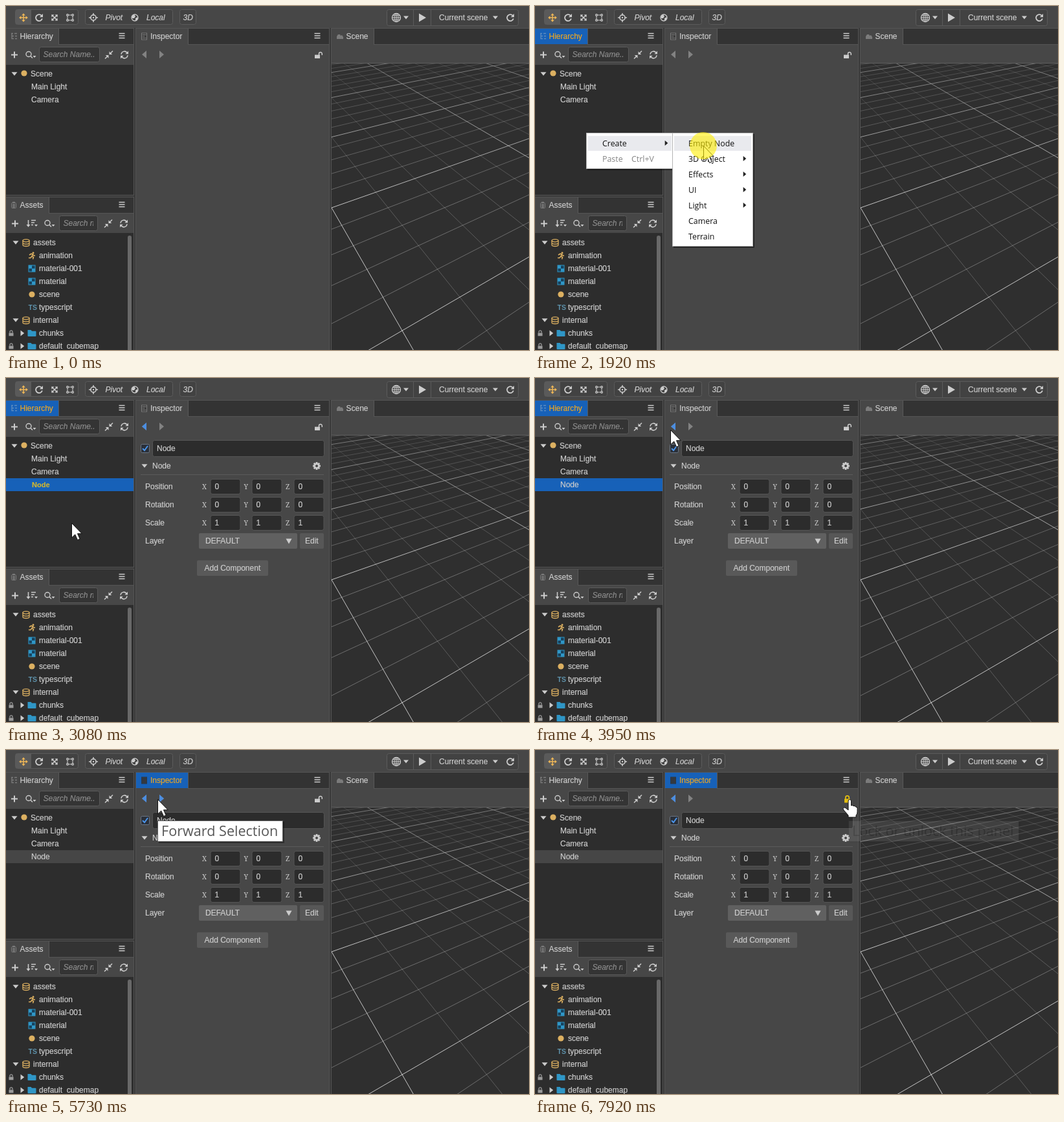
Recreate the animation shown at these times as an HTML page. Size 808x532 px, loop 8000 ms.

```html
<!DOCTYPE html>
<html lang="en">
<head>
<meta charset="utf-8">
<title>Editor walkthrough</title>
<style>
html,body{margin:0;width:100%;height:100%;overflow:hidden;background:#474747}
svg{display:block;width:808px;height:532px}
text{font:12px "Liberation Sans",Arial,sans-serif;fill:currentColor;stroke:currentColor;stroke-width:.2;white-space:pre}
.i{font-style:italic}
.m{font:12.4px "Open Sans","Noto Sans",sans-serif;stroke:none}
.tip{font:21.6px "Open Sans","Noto Sans",sans-serif;stroke:none}
.ax{font:10.5px "Noto Serif","Liberation Serif",serif;stroke:none}
.ts{font-weight:bold;font-size:10.5px;stroke:none}
</style>
</head>
<body>
<svg id="stage" viewBox="0 0 808 532"></svg>
<script>
const FG = '#cccccc', PANEL = '#474747', STRIP = '#333333', DARK = '#2d2d2d', EDGE = '#545454';
const BLUE = '#1761b8', GOLD = '#dcb061', SKY = '#2f96c6', LOOP = 8000;

// --- drawing helpers ---
const rect = (x, y, w, h, fill, extra = '') =>
  `<rect x="${x}" y="${y}" width="${w}" height="${h}" fill="${fill}" ${extra}/>`;
const box = (x, y, w, h, fill, line, r = 3) =>
  rect(x + .5, y + .5, w - 1, h - 1, fill, `rx="${r}" stroke="${line}"`);
const text = (x, y, s, color = FG, cls = '', extra = '') =>
  `<text x="${x}" y="${y}" class="${cls}" color="${color}" ${extra}>${s}</text>`;
const fill = (d, c = FG) => `<path d="${d}" fill="${c}"/>`;
const line = (d, c = FG, w = 1.5) => `<path d="${d}" fill="none" stroke="${c}" stroke-width="${w}"/>`;
const dot = (x, y, r, c) => `<circle cx="${x}" cy="${y}" r="${r}" fill="${c}"/>`;
const ring = (x, y, r, c = FG, w = 1.4) =>
  `<circle cx="${x}" cy="${y}" r="${r}" fill="none" stroke="${c}" stroke-width="${w}"/>`;
const at = (x, y, s) => `<g transform="translate(${x} ${y})">${s}</g>`;
const turn = (a, s) => `<g transform="rotate(${a})">${s}</g>`;
const clip = (x, y, w, h, s) =>
  `<svg x="${x}" y="${y}" width="${w}" height="${h}" viewBox="${x} ${y} ${w} ${h}">${s}</svg>`;
// visible only inside the listed time spans
const during = (spans, s) => `<g data-on="${spans}">${s}</g>`;

// --- icons, centred on 0,0 ---
const down = (c = FG, r = 4.5) => fill(`M${-r}${-r * .6}H${r}L0 ${r * .6}z`, c);
const right = (c = FG) => fill('M-2.5-4.5V4.5L3.2 0z', c);
const plus = line('M-5 0H5M0-5V5', FG, 2);
const burger = line('M-4.5-3.5H4.5M-4.5 0H4.5M-4.5 3.5H4.5', FG, 1.5);
const search = ring(-2, -.5, 4) + line('M1 2.5L4 5.5') + at(7, 3.5, down(FG, 2.5));
const shrink = line('M6-6L2-2M-6 6L-2 2') + fill('M.5-5.2V-.5H5.2zM-.5 5.2V.5H-5.2z');
const sync = line('M-5-.8A5 5 0 0 1 4-3.3M5 .8A5 5 0 0 1-4 3.3') + fill('M6-6V-1.3H1.4zM-6 6V1.3H-1.4z');
const reload = line('M3.8-3.2A5 5 0 1 0 4.9 1.5', FG, 1.8) + fill('M6-6V-.8H.8z');
const tips = (c, a) => [0, 90, 180, 270].map(d =>
  turn(d + a, line('M0 0V-4', c, 1.5) + fill('M0-6.8L2.8-3.6H-2.8z', c))).join('');
const frame = box(-4.5, -4.5, 9, 9, 'none', FG, 0) +
  [[-4, -4], [4, -4], [-4, 4], [4, 4]].map(p => dot(p[0], p[1], 2, FG) + dot(p[0], p[1], .8, PANEL)).join('');
const target = ring(0, 0, 4.2) + dot(0, 0, 1.2, FG) + line('M0-7V-3M0 7V3M-7 0H-3M7 0H3');
const globe = ring(0, 0, 6.5, FG, 1.3) + '<ellipse rx="3" ry="6.5" fill="none" stroke="#ccc"/>' +
  line('M-6.5 0H6.5M0-6.5V6.5M-5.5-3.3H5.5M-5.5 3.3H5.5', FG, 1);
const earth = ring(0, 0, 5, FG, 1.3) + fill('M-4.5-2L-1-5L1-2L-1 1L-4 1zM1 1L4.5-1L4 3L1 5z');
const drum = line('M-5-3.2V3.5A5 2 0 0 0 5 3.5V-3.2M-5 .2A5 2 0 0 0 5 .2', GOLD, 1.3) +
  `<ellipse cy="-3.2" rx="5" ry="2" fill="none" stroke="${GOLD}" stroke-width="1.3"/>`;
const runner = dot(2, -4.3, 1.5, GOLD) + line('M-4-1L-1-2.8L1.5-1.8L0 1L2.5 2.5L1.5 5.5M0 1L-2 3.5H-5M1.5-1.8L3 0H5', GOLD, 1.6);
const checker = box(-5.5, -5.5, 11, 11, '#17435e', SKY, 0) + rect(-5, -5, 5, 5, SKY) + rect(0, 0, 5, 5, SKY);
const folder = fill('M-6.5-5H-1.5L0-3.3H5.5Q6.5-3.3 6.5-2.3V4Q6.5 5 5.5 5H-5.5Q-6.5 5-6.5 4z', SKY);
const padlock = c => rect(-3.5, -.5, 7, 4.8, c) + line('M-2-.5V-2.2A2 2 0 0 1 2-2.2V-.5', c, 1.3);
const gear = [0, 45, 90, 135].map(a => turn(a, rect(-1.4, -6, 2.8, 12, FG))).join('') +
  dot(0, 0, 4.4, FG) + dot(0, 0, 2, PANEL);
const treeIcon = c => line('M-4-4.5H-1M-3 -4V3.5H0M-3-.5H0M1-4.5H5M2-.5H5M2 3.5H5', c, 1.3);
const pageIcon = c => box(-4.5, -5.5, 9, 11, '#3a3a3a', c, 0) + line('M-3-2.5H3M-3 0H1M-3 2.5H3', c, 1);
const clipIcon = c => box(-4, -4, 8, 9, 'none', c, 1) + line('M-2-4.5H2M-2-1H2M-2 1H2M-2 3H2', c, 1.3);
const cloudIcon = c => fill('M-5 4V0L-3-3H0L1-1L3-2L5 1V4z', c);

// --- panels ---
function topBar() {
  const edge = '#5b5b5b', bg = '#424242';
  return rect(0, 0, 808, 34, PANEL) +
    box(14, 5, 98, 24, bg, edge) + rect(15, 6, 24, 22, '#5a5a5a') +
    at(27, 18, tips('#efb757', 0)) + at(51, 18, reload) + at(75, 18, tips(FG, 45)) + at(99, 18, frame) +
    box(122, 5, 136, 24, bg, edge) + at(135, 18, target) + text(153.5, 22, 'Pivot', FG, 'i') +
    at(199, 18, earth) + text(217, 22, 'Local', FG, 'i') +
    box(268, 5, 26, 24, bg, edge) + text(273.5, 22, '3D', FG, 'i') +
    box(588, 5, 204, 26, bg, edge) + rect(629, 6, 1, 24, edge) + rect(656, 6, 1, 24, edge) +
    at(603, 18, globe) + at(618, 18, down(FG, 4)) + at(643, 18, fill('M-5-6.5V6.5L6 0z')) +
    text(669, 22, 'Current scene') + at(756, 18, down(FG, 4)) + at(779, 18, reload);
}

// thin light outline of a dock area
const dock = (x, y, w, h) => box(x - 1, y - 1, w + 2, h + 2, PANEL, EDGE, 0);

function tab(x, y, w, panelW, label, icon, ix, focus) {
  const face = (h, bg, fg, ic) => rect(x, y, w, h, bg) + at(ix, y + 12, icon(ic)) +
    text(ix + 9.5, y + 16, label, fg);
  return rect(x, y, panelW, 25, STRIP) + face(25, PANEL, FG, '#7b7b7b') +
    rect(x + w, y, 1, 25, '#595959') + rect(x + w, y + 24, panelW - w, 1, '#555') +
    (focus ? during(focus, face(24, BLUE, '#eaa526', label === 'Inspector' ? '#26374c' : '#5d8cc0')) : '');
}

const field = (x, y, w, h, s) => box(x, y, w, h, '#343434', '#5a5a5a') +
  clip(x + 6, y, w - 13, h, text(x + 6.5, y + h / 2 + 4, s, '#8b8b8b', 'i'));

function hierarchy() {
  return dock(0, 35, 197, 257) + tab(0, 35, 81, 197, 'Hierarchy', treeIcon, 12, '840-4180') + at(179, 46, burger) +
    rect(0, 60, 197, 31, PANEL) + at(13, 75.5, plus) + at(37, 75, search) +
    field(51, 63, 94, 24, 'Search Name...') + at(159, 75.5, shrink) + at(183, 75.5, sync) +
    rect(0, 91, 197, 201, DARK) +
    at(13, 105, down()) + dot(28, 104, 4.6, GOLD) + text(38, 108.5, 'Scene') +
    text(39, 129, 'Main Light') + text(39, 149, 'Camera') +
    during('2000-2610', box(34, 155, 160, 20, '#232323', '#3a7fd0') + rect(38, 158, 30, 14, BLUE) + text(39, 169, 'Node', '#eee')) +
    during('2610-4180', rect(0, 155, 197, 20, BLUE)) +
    during('4180-4340,5730-8000', rect(0, 155, 197, 20, '#464646')) +
    during('2610-8000', text(39, 169, 'Node', FG, '', 'id="node"'));
}

function assets() {
  const leaf = (y, icon, s) => at(40, y, icon) + text(51, y + 4, s);
  const root = (y, s) => at(15, y, down()) + at(31, y, drum) + text(42, y + 4, s);
  const dir = (y, s) => at(8, y, padlock('#9a9a9a')) + at(25, y, right()) + leaf(y, folder, s);
  const sort = line('M-4.5-5V4M0-4.5H7M0-1H5M0 2.5H3') + fill('M-7.5 2H-1.5L-4.5 6z') + at(7.5, 3.5, down(FG, 2.5));
  return dock(0, 296, 197, 240) + tab(0, 296, 66, 197, 'Assets', clipIcon, 12) + at(179, 307, burger) +
    rect(0, 321, 197, 30, PANEL) + at(14, 336.5, plus) + at(39, 336, sort) + at(66, 336, search) +
    field(82, 324, 60, 24, 'Search name') + at(158, 336.5, shrink) + at(182, 336.5, sync) +
    rect(0, 351, 197, 181, DARK) + rect(188, 355, 6, 190, '#686868', 'rx="3"') +
    root(366, 'assets') + leaf(386, runner, 'animation') + leaf(406, checker, 'material-001') +
    leaf(426, checker, 'material') + leaf(446, dot(0, 0, 4.6, GOLD), 'scene') +
    leaf(466, text(-5.5, 4, 'TS', '#5f93ad', 'ts'), 'typescript') +
    root(486, 'internal') + dir(506, 'chunks') + dir(526, 'default_cubemap');
}

function props() {
  const input = (x, y, w, h, s) => box(x, y, w, h, '#2c2c2c', '#555') + text(x + 7, y + h / 2 + 4, s);
  const vec = (y, label, v) => text(215, y + 4, label) + [[303, 'X', 316], [367.5, 'Y', 380], [432, 'Z', 445]]
    .map(([lx, n, ix]) => text(lx, y + 3.5, n, FG, 'ax') + input(ix - .5, y - 12, 47, 24, v)).join('');
  return box(208, 102, 14, 14, '#2a2f38', '#6a7686', 2) + line('M211 109L214 112L219 105', '#4a96ee', 2) +
    input(226, 96, 266, 26, 'Node') +
    at(214, 136, down()) + text(226, 140, 'Node') + at(480, 136, gear) + rect(208, 149, 283, 1, '#5b5b5b') +
    vec(168, 'Position', 0) + vec(196, 'Rotation', 0) + vec(224, 'Scale', 1) +
    text(215, 256, 'Layer') + rect(298, 240, 152, 24, '#606060', 'rx="2"') + text(308, 256, 'DEFAULT') +
    at(437, 252, fill('M-4.5-3.5H4.5L0 4.5z')) +
    rect(454, 240, 37, 24, '#575757', 'rx="2"') + text(462, 256, 'Edit') +
    rect(295, 282, 110, 24, '#595959', 'rx="2"') + text(306.5, 298, 'Add Component');
}

function inspector() {
  const back = c => fill('M217 69V81L210 75z', c), next = c => fill('M237 69V81L244 75z', c);
  return dock(201, 35, 298, 500) + tab(201, 35, 80, 298, 'Inspector', pageIcon, 213.5, '4180-8000') + at(481, 46, burger) +
    rect(201, 60, 298, 472, PANEL) +
    back('#828282') + next('#828282') +
    during('2610-4640,5730-8000', back('#4b8de0')) + during('4340-5810', next('#4b8de0')) +
    during('0-7540', rect(477, 75.5, 8, 5.5, FG) + line('M483.5 76V74A2.4 2.4 0 0 1 488.3 74V76', FG, 1.5)) +
    during('7540-8000', rect(478, 75.5, 9, 6, '#e3bd10') + line('M479.8 76V73.5A2.7 2.7 0 0 1 485.2 73.5V76', '#e3bd10', 1.7)) +
    during('2610-4490,5730-8000', props());
}

function scene() {
  // two families of lines, each running to its own vanishing point
  const O = [503, 312], A = [1600, -73], B = [282, -73], ka = .0663, kb = -.0661;
  const on = (vp, k, n) => [0, 1].map(i => (O[i] + vp[i] * k * n) / (1 + k * n));
  const ray = (p, vp, n, dim) => {
    const pt = s => (vp[0] + (p[0] - vp[0]) * s).toFixed(1) + ' ' + (vp[1] + (p[1] - vp[1]) * s).toFixed(1);
    const major = n % 5 === 0;
    return `<path d="M${pt(.02)}L${pt(4)}" stroke="#fff" stroke-opacity="${major ? .72 : dim}"/>`;
  };
  let grid = '';
  for (let n = -35; n < 15; n++) grid += ray(on(B, kb, n), A, n, .3);
  for (let n = -1; n < 40; n++) grid += ray(on(A, ka, n), B, n, .22);
  return dock(503, 35, 310, 500) + tab(503, 35, 65, 305, 'Scene', cloudIcon, 516, '') +
    rect(503, 60, 305, 28, PANEL) + rect(503, 88, 305, 1, '#5f5f5f') + rect(503, 89, 305, 443, '#2f2f2f') +
    '<linearGradient id="fade" x2="0" y2="1"><stop stop-color="#777"/><stop offset=".5" stop-color="#fff"/></linearGradient>' +
    `<mask id="far" maskUnits="userSpaceOnUse" x="503" y="89" width="305" height="443">${rect(503, 89, 305, 443, 'url(#fade)')}</mask>` +
    `<g mask="url(#far)">${clip(503, 89, 305, 443, grid)}</g>`;
}

function menus() {
  const sheet = (x, y, w, h) => rect(x + 2, y + 2, w, h, '#000', 'opacity=".45"') + box(x, y, w, h, '#fff', '#b4b4b4', 0);
  const hot = (x, w) => rect(x, 201, w, 23, '#e9eaee');
  const more = (x, y) => at(x, y, fill('M-2.3-4V4L2.3 0z', '#222'));
  const items = ['Empty Node', '3D Object', 'Effects', 'UI', 'Light', 'Camera', 'Terrain'];
  return during('840-2000', sheet(79, 196, 134, 56) + during('990-2000', hot(82, 129)) +
      text(104, 217, 'Create', '#111', 'm') + more(203, 212) +
      text(104, 241, 'Paste', '#858585', 'm') + text(149, 241, 'Ctrl+V', '#858585', 'm')) +
    during('1310-2000', sheet(212, 196, 125, 176) + during('1680-2000', hot(215, 119)) +
      items.map((s, i) => text(237, 217 + 24 * i, s, '#111', 'm') + (i > 0 && i < 5 ? more(324, 212 + 24 * i) : '')).join(''));
}

const tip = (id, x, w, s) => `<g id="${id}">${rect(x + 2, 111, w, 33, '#000', 'opacity=".35"')}` +
  box(x, 109, w, 33, '#fff', '#5e5e5e', 0) + text(x + 6, 133, s, '#575757', 'tip') + '</g>';

const arrow = '<path d="M.5.5V23L5.7 18L9.6 26.5L13.2 25L9.5 16.7H16.2z" fill="#fff" stroke="#111"/>';
const hand = '<path d="M-1 3Q-1 .5 1.2.5Q3.5.5 3.5 3V10Q5.5 9 7 10.5Q9.5 10 10.5 12Q13 12 13 14.5V20Q13 23 11 25V28H-1V25L-8 17Q-10 14.5-8 13Q-6 12.4-4 14.5L-1 17z" fill="#fff" stroke="#111"/>';
const press = (spans, x, y) => during(spans, `<g opacity=".6">${dot(x, y, 21, '#ffee00')}</g>`);

const stage = document.getElementById('stage');
stage.innerHTML = rect(0, 0, 808, 532, '#383838') + topBar() + hierarchy() + assets() + inspector() + scene() + menus() +
  tip('tipNext', 234, 194, 'Forward Selection') + tip('tipLock', 484, 264, 'Lock or unlock this panel') +
  `<g id="cursor">${during('210-7290', arrow)}${during('7290-8000', hand)}</g>` +
  press('1920-2000', 260, 216) + press('4180-4340', 214, 75) +
  press('5420-5730', 234, 76) + press('7370-7540', 484, 75);

// --- motion: start, end, steps, way points ---
const moves = [
  [210, 760, 8, [[487, 475], [420, 400], [250, 270], [120, 208], [79, 196]], true],
  [990, 1140, 3, [[79, 196], [83, 207]]],
  [1310, 1680, 6, [[83, 207], [112, 190], [190, 188], [245, 207], [260, 216]]],
  [2230, 2460, 4, [[260, 216], [180, 222], [112, 225], [101, 224]]],
  [3480, 4030, 8, [[101, 224], [116, 200], [165, 135], [204, 85], [214, 75]]],
  [5190, 5270, 2, [[214, 75], [226, 82], [234, 76]]],
  [6290, 7070, 11, [[234, 76], [226, 80], [260, 88], [350, 95], [440, 95], [485, 93], [492, 89], [492, 89]]],
  [7140, 7290, 3, [[492, 89], [490, 84], [485, 76]]],
];
const fades = [[0, 1], [80, .75], [160, .42], [230, .08], [320, 0]];

function cursorAt(t) {
  const [a, b, n, pts, fresh] = moves.filter(m => t >= m[0]).pop() || moves[0];
  const k = Math.min(n - 1, Math.floor((t - a) / (b - a) * (n - 1) + .01));
  const p = Math.max(0, fresh ? k / (n - 1) : (k + 1) / n) * (pts.length - 1);
  const i = Math.min(pts.length - 2, Math.floor(p)), f = p - i;
  return [0, 1].map(d => Math.round(pts[i][d] + (pts[i + 1][d] - pts[i][d]) * f));
}

const fadeAt = t => t < 0 ? 0 : fades.filter(f => t >= f[0]).pop()[1];

const parts = [...stage.querySelectorAll('[data-on]')].map(el =>
  [el, el.dataset.on.split(',').map(s => s.split('-').map(Number))]);
const $ = id => document.getElementById(id);
const node = $('node'), cursor = $('cursor'), tipNext = $('tipNext'), tipLock = $('tipLock');

function draw(t) {
  for (const [el, spans] of parts)
    el.style.display = spans.some(([a, b]) => t >= a && t < b) ? '' : 'none';
  cursor.setAttribute('transform', `translate(${cursorAt(t).join(' ')})`);
  tipNext.style.opacity = fadeAt(t - 5730);
  tipLock.style.opacity = fadeAt(t - 7690);
  // a new node flashes yellow, then settles
  const flash = Math.max(0, Math.min(1, (3440 - t) / 300));
  const mix = (a, b) => Math.round(a + (b - a) * flash);
  node.setAttribute('color', `rgb(${mix(204, 206)},${mix(204, 180)},${mix(204, 50)})`);
  node.style.fontWeight = flash > 0 ? 'bold' : '';
  node.style.fontSize = flash > 0 ? '11px' : '';
  node.setAttribute('x', flash > 0 ? 40 : 39);
}

const start = performance.now();
(function tick() {
  draw((performance.now() - start) % LOOP);
  requestAnimationFrame(tick);
})();
</script>
</body>
</html>
```
